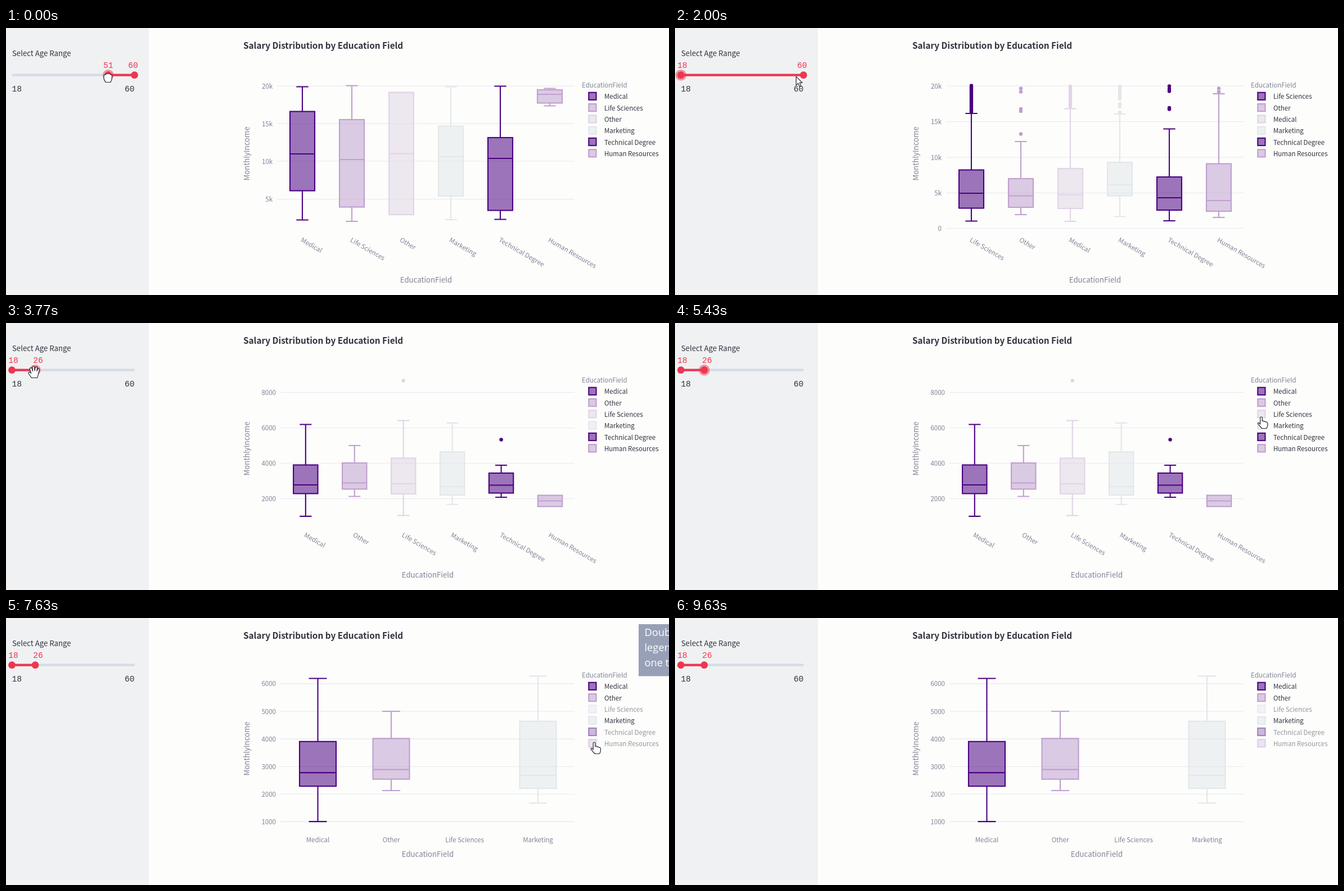
These frames come from a looping animation (1179x475 px, 9.66 s). An HTML page:

```html
<!DOCTYPE html>
<html lang="en">
<head>
<meta charset="utf-8">
<title>Salary distribution</title>
<style>
  html, body { margin: 0; width: 100%; height: 100%; overflow: hidden; background: #fdfdfc; }
  svg { display: block; }
  text { font-family: "Noto Sans CJK JP", "Noto Sans CJK SC", "Noto Sans", sans-serif; fill: #31333f; white-space: pre; }
  .mono { font: 14.7px "Liberation Mono", monospace; }
  .red { fill: #ee3650; }
  .label { font-size: 13.2px; }
  .small { font-size: 11.5px; }
  .soft { fill: #808495; }
  .title { font-size: 15.3px; font-weight: 700; }
  .note text { font: 18.2px "Open Sans", sans-serif; fill: #fff; }
  .cursor path { fill: #fff; stroke: #25252d; stroke-width: 1.2; stroke-linejoin: round; }
</style>
</head>
<body>
<script>
const LOOP = 9660;
const COLORS = ['#4b0082', '#bf9fcf', '#e0d4e6', '#e2e7ea', '#4b0082', '#bf9fcf'];
const RED = '#ee3650';

function el(parent, tag, attrs = {}, content) {
  const node = document.createElementNS('http://www.w3.org/2000/svg', tag);
  for (const k in attrs) node.setAttribute(k, attrs[k]);
  if (content !== undefined) node.textContent = content;
  parent.append(node);
  return node;
}
const set = (node, attrs) => { for (const k in attrs) node.setAttribute(k, attrs[k]); };
const show = (node, on) => { node.style.display = on ? '' : 'none'; };
const span = (a, b, n) => Array.from({ length: n }, (_, i) => a + (b - a) * i / (n - 1));
const swatch = color => ({ fill: color, 'fill-opacity': .54, stroke: color, 'stroke-width': 2.1 });

const svg = el(document.body, 'svg', { width: 1179, height: 475, viewBox: '0 0 1179 475' });
el(svg, 'rect', { width: 1179, height: 475, fill: '#fdfdfc' });
el(svg, 'rect', { width: 254, height: 475, fill: '#eff1f2' });
el(svg, 'text', { x: 422, y: 36.5, class: 'title' }, 'Salary Distribution by Education Field');

// Each row: name, upper whisker, q3, median, q1, lower whisker, outliers
const olderRows = [
  ['Medical', 104.5, 148.5, 224, 289.5, 341.5],
  ['Life Sciences', 102.5, 163, 234, 318.5, 344],
  ['Other', 114.5, 114.5, 223.5, 332, 332],
  ['Marketing', 104.5, 174.5, 229, 299, 341],
  ['Technical Degree', 103.5, 195, 232, 324.5, 340.5],
  ['Human Resources', 107.5, 110, 118, 133.5, 138.5]
];
const allRows = [
  ['Life Sciences', 152, 252.5, 294, 320.5, 343.5, span(102.5, 149, 26)],
  ['Other', 202, 268, 298.5, 319, 332, [107.5, 113.5, 144, 148, 188.5]],
  ['Medical', 143.5, 250, 296.5, 321, 344, span(104, 140, 15)],
  ['Marketing', 153, 239, 279, 298.5, 335.5, [...span(104, 126, 7), 135, 140, 150]],
  ['Technical Degree', 179.5, 265, 302, 324, 343, [103.5, 108.5, 112.5, 142, 144.5]],
  ['Human Resources', 117, 241.5, 307, 326, 337, [107.5, 113.5]]
];
const youngRows = [
  ['Medical', 6190, 3905, 2778, 2286, 1005],
  ['Other', 5000, 4016, 2889, 2540, 2127],
  ['Life Sciences', 6413, 4286, 2841, 2270, 1048, [8667]],
  ['Marketing', 6275, 4640, 2683, 2206, 1675],
  ['Technical Degree', 3889, 3444, 2762, 2317, 2079, [5333]],
  ['Human Resources', 2190, 2190, 1873, 1555, 1555]
];
const kTicks = (ys, top) => ys.map((y, i) => [y, top - 5 * i ? top - 5 * i + 'k' : '0']);
const plainTicks = (from, to, step) => {
  const out = [];
  for (let v = from; v <= to; v += step) out.push([v, v]);
  return out;
};

const wide = { left: 482, x0: 527, dx: 88, half: 22, base: 0, k: -1, titleX: 747 };
const young = { rows: youngRows, left: 488, x0: 532.8, dx: 86.95, half: 21.7, titleX: 750 };
const zoomed = { ...young, base: 390, k: .04566, ticks: plainTicks(1000, 6000, 1000) };
const charts = [
  { ...wide, at: 0, rows: olderRows, ticks: kTicks([103, 170, 237, 304.5], 20) },
  { ...wide, at: 1600, rows: allRows, ticks: kTicks([103, 166.5, 230, 293.5, 356.5], 20) },
  { ...young, at: 3450, base: 375.5, k: .0315, ticks: plainTicks(2000, 8000, 2000) },
  { ...zoomed, at: 5970, hidden: [2] },
  { ...zoomed, at: 6600, hidden: [2, 4] },
  { ...zoomed, at: 7250, hidden: [2, 4, 5], base: 411.5, k: .0491,
    x0: 554.5, dx: 130.5, half: 32.5, flat: true }
];

function drawBox(g, row, x, half, color, y) {
  const [hi, q3, med, q1, lo] = row.slice(1, 6).map(y);
  const cap = half / 2 - .3;
  let d = `M${x - half} ${med}h${2 * half}`;
  if (hi !== q3) d += `M${x} ${q3}V${hi}M${x - cap} ${hi}h${2 * cap}`;
  if (lo !== q1) d += `M${x} ${q1}V${lo}M${x - cap} ${lo}h${2 * cap}`;
  el(g, 'rect', { x: x - half, y: q3, width: 2 * half, height: q1 - q3, ...swatch(color) });
  el(g, 'path', { d, fill: 'none', stroke: color, 'stroke-width': 2.1 });
  for (const v of row[6] || []) el(g, 'circle', { cx: x, cy: y(v), r: 3.2, fill: color });
}

function drawLegend(g, rows, hidden) {
  el(g, 'text', { x: 1024, y: 105.8, class: 'small soft' }, 'EducationField');
  rows.forEach(([name], i) => {
    const y = 121.7 + 20.3 * i;
    const item = el(g, 'g', { opacity: hidden.includes(i) ? .5 : 1 });
    el(item, 'rect', { x: 1036.3, y: y - 7, width: 13.2, height: 13.2, ...swatch(COLORS[i]) });
    el(item, 'text', { x: 1064, y: y + 4.6, class: 'small' }, name);
  });
}

function drawChart(c) {
  const g = el(svg, 'g');
  const y = v => c.base - c.k * v;
  const hidden = c.hidden || [];
  for (const [v, label] of c.ticks) {
    el(g, 'path', { d: `M${c.left} ${y(v)}H1011`, stroke: '#e6e8f1', 'stroke-width': 1.1 });
    el(g, 'text', { x: c.left - 8, y: y(v) + 4.5, class: 'small soft', 'text-anchor': 'end' }, label);
  }
  c.rows.forEach((row, i) => {
    const x = c.x0 + c.dx * i;
    if (!hidden.includes(i)) drawBox(g, row, x, c.half, COLORS[i], y);
    if (!c.flat) {
      el(g, 'text', { transform: `translate(${x - 3.7} 379.5) rotate(30)`, class: 'small soft' }, row[0]);
    } else if (i < 4) {
      el(g, 'text', { x, y: 399.3, class: 'small soft', 'text-anchor': 'middle' }, row[0]);
    }
  });
  el(g, 'text', { x: c.titleX, y: c.flat ? 425 : 453, class: 'label soft', 'text-anchor': 'middle' }, 'EducationField');
  el(g, 'text', { transform: `translate(433 ${c.flat ? 232.5 : 223.5}) rotate(-90)`,
    class: 'label soft', 'text-anchor': 'middle' }, 'MonthlyIncome');
  drawLegend(g, c.rows, hidden);
  return g;
}
const chartNodes = charts.map(drawChart);

// Slider
el(svg, 'text', { x: 11, y: 49.6, class: 'label' }, 'Select Age Range');
el(svg, 'text', { x: 10.5, y: 112.5, class: 'mono' }, '18');
el(svg, 'text', { x: 228.7, y: 112.5, class: 'mono', 'text-anchor': 'end' }, '60');
el(svg, 'rect', { x: 10.5, y: 81.6, width: 218.5, height: 4.2, rx: 2, fill: '#d6dbe8' });
const fillBar = el(svg, 'rect', { y: 81.6, height: 4.2, fill: RED });
const ring = el(svg, 'circle', { cy: 83.7, r: 9.8, fill: RED, opacity: .5 });
const thumbs = [0, 1].map(() => el(svg, 'circle', { cy: 83.7, r: 6.4, fill: RED }));
const values = [0, 1].map(() => el(svg, 'text', { y: 70.7, class: 'mono red', 'text-anchor': 'middle' }));

// Notification
const note = el(svg, 'g', { class: 'note' });
el(note, 'rect', { x: 1125, y: 11, width: 60, height: 92.5, fill: '#8c97af' });
['Double-click on', 'legend to isolate', 'one trace'].forEach((line, i) =>
  el(note, 'text', { x: 1135.5, y: 31.5 + 27.3 * i }, line));

// Pointer shapes
const cursor = el(svg, 'g', { class: 'cursor' });
const shapes = {};
function addShape(name, d) {
  shapes[name] = el(cursor, 'path', { d });
}
addShape('arrow', 'M0 0V15.5L3.7 12L6.2 17.8L8.8 16.7L6.3 11H11Z');
addShape('grab', 'M-4 11L-9 4Q-10.5 1.5-8.5 1T-5 3L-7-4Q-7.5-6.5-5.6-6.8T-3.2-5L-2-1L-2.6-7Q-2.6-9.5-.8-9.5T1.2-7.5L1.5-1.5L2.6-7Q3.2-9 4.8-8.6T6-6L5.4-1L7-4.5Q8-6 9.3-5.2T9.8-2.5L8 4Q7.5 7.5 6 11Z');
addShape('fist', 'M-7-2Q-6.5-6-3.5-5Q-2.5-8 .5-6.5Q3-8 4.5-5.3Q8-5.5 7.5-1Q7.5 4 5 8.5H-3.5Q-8 3-7-2Z');
addShape('point', 'M-1.8 1.6Q-1.8 0 0 0T1.8 1.6V7.5Q4.6 6.6 5 8.4Q8 7.6 8.4 9.4Q11.4 8.8 11.4 11.5V14.5Q11.4 17 9.5 20.5H1L-5.6 12.8Q-6.6 10.6-4.4 10.6L-1.8 13Z');

// Motion tables: time, value(s)
const lowKeys = [[0, 51], [120, 51], [900, 18]];
const highKeys = [[2250, 60], [2830, 39], [3200, 26]];
const cursorKeys = [
  [0, 181, 88], [120, 181, 88], [900, 5, 88], [1080, -4, 93], [1400, -4, 93],
  [2100, 228, 86], [2250, 228, 86], [2830, 108, 86], [3200, 49.5, 86.5], [4000, 49.5, 86.5],
  [4250, 330, 350], [4500, 760, 452], [4800, 1120, 330], [5100, 1042.5, 167], [6000, 1042.5, 167],
  [6300, 1044, 202], [6650, 1044, 202], [6950, 1046, 221], [8050, 1046, 221],
  [8400, 1115, 340], [8800, 1182, 480]
];
const shapeSteps = [[0, 'fist'], [980, 'arrow'], [2050, 'grab'], [2200, 'fist'],
  [3280, 'grab'], [4060, 'arrow'], [5050, 'point'], [8110, 'arrow']];

// Smooth curve through the keys, at rest wherever a value repeats or ends
function curve(keys, t, col = 1) {
  const last = keys.length - 1;
  if (t <= keys[0][0]) return keys[0][col];
  if (t >= keys[last][0]) return keys[last][col];
  const i = keys.findIndex(k => k[0] > t) - 1;
  const slope = j => {
    if (j === 0 || j === last) return 0;
    const [a, b, c] = [keys[j - 1], keys[j], keys[j + 1]];
    return (b[col] - a[col]) * (c[col] - b[col]) <= 0 ? 0 : (c[col] - a[col]) / (c[0] - a[0]);
  };
  const [p, q] = [keys[i], keys[i + 1]];
  const h = q[0] - p[0], u = (t - p[0]) / h, w = u * u * (3 - 2 * u);
  return p[col] * (1 - w) + q[col] * w
    + h * u * (1 - u) * ((1 - u) * slope(i) - u * slope(i + 1));
}
const ramp = (t, from, to) => Math.min(1, Math.max(0, (t - from) / (to - from)));
const ageX = v => 10.5 + (v - 18) / 42 * 218;

function drawSlider(t) {
  const ages = [Math.round(curve(lowKeys, t)), Math.round(curve(highKeys, t))];
  const [a, b] = ages.map(ageX);
  set(fillBar, { x: a, width: b - a });
  set(ring, { cx: t < 2200 ? a : b });
  show(ring, t < 5950);
  // Labels stay inside the panel and apart from each other
  let left = Math.max(a, 13), right = Math.min(b, 226);
  if (t < 2200) left = Math.min(left, right - 44);
  else right = Math.max(right, left + 44);
  [[a, left], [b, right]].forEach(([x, lx], i) => {
    set(thumbs[i], { cx: x });
    set(values[i], { x: lx });
    values[i].textContent = ages[i];
  });
}

function render(t) {
  const current = charts.findLastIndex(c => t >= c.at);
  chartNodes.forEach((g, i) => show(g, i === current));
  drawSlider(t);
  set(note, { opacity: .9 * ramp(t, 5970, 6600) * (1 - ramp(t, 8920, 9560)) });
  const shape = shapeSteps.findLast(s => t >= s[0])[1];
  for (const name in shapes) show(shapes[name], name === shape);
  show(cursor, t < 8800);
  set(cursor, { transform: `translate(${curve(cursorKeys, t, 1)} ${curve(cursorKeys, t, 2)})` });
}

const start = performance.now();
function tick() {
  render((performance.now() - start) % LOOP);
  requestAnimationFrame(tick);
}
render(0);
requestAnimationFrame(tick);
</script>
</body>
</html>
```
